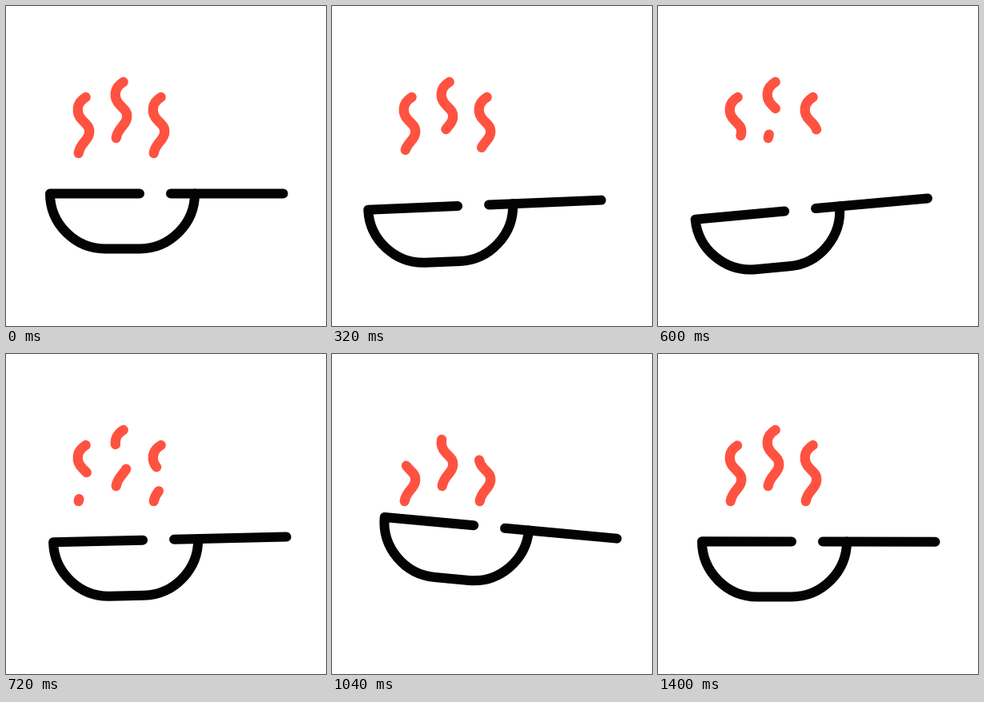
An HTML page for the animation above (1440 ms loop, 400 px wide and 400 px high).

```html
<!DOCTYPE html>
<html lang="en">
<head>
<meta charset="utf-8">
<title>Steaming pan</title>
<style>
  html, body { margin: 0; width: 100%; height: 100%; overflow: hidden; background: #fff; }
  svg { display: block; width: 100%; height: 100%; }
  path { fill: none; stroke-linecap: round; stroke-linejoin: round; }
  #pan { stroke: #030303; stroke-width: 12; }
  #steam { stroke: #ff5240; stroke-width: 12.3; }
</style>
</head>
<body>
<svg viewBox="0 0 400 400">
  <g id="steam"></g>
  <g id="pan">
    <path d="M167 234.5H55C55 272 86 303.5 124 303.5H167C205 303.5 236 272 236 234.5"/>
    <path d="M206 234.5H346.5"/>
  </g>
</svg>
<script>
const LOOP = 1440, STEP = 40;
const WAVE = "M100 114C88 121 87 134 96 143C101 148 105 151 104.5 158C104 168 93 171 91 184";

const pan = document.getElementById("pan");
const steam = document.getElementById("steam");

// Progress from 0 to 1 between two times.
const span = (t, from, to) => Math.min(1, Math.max(0, (t - from) / (to - from)));

function smooth(t, from, to) {
  const u = span(t, from, to);
  return u * u * (3 - 2 * u);
}

// Rest, first extreme, second extreme, rest again.
function swing(t, start, dip, peak, end, low, high) {
  return low * smooth(t, start, dip)
    + (high - low) * smooth(t, dip, peak)
    - high * smooth(t, peak, end);
}

function addWave(x, y) {
  const p = document.createElementNS("http://www.w3.org/2000/svg", "path");
  p.setAttribute("d", WAVE);
  p.setAttribute("pathLength", 1);
  p.setAttribute("transform", `translate(${x} ${y})`);
  return steam.appendChild(p);
}

function makePuff(x, y, delay) {
  return { delay, upper: addWave(x, y), lower: addWave(x, y) };
}

const puffs = [makePuff(-0.3, 0, 130), makePuff(46.7, -19, 0), makePuff(93.7, 0, 65)];

// Shows only the part of a wave between two fractions of its length.
function trim(path, from, to) {
  const len = to - from;
  path.style.display = len > 0.004 ? "" : "none";
  path.setAttribute("stroke-dasharray", `${len} 2`);
  path.setAttribute("stroke-dashoffset", -from);
}

function draw(t) {
  const x = swing(t, 0, 500, 870, 1350, -14, 14.2);
  const y = swing(t, 0, 545, 870, 1410, 22.5, -22.5);
  const turn = swing(t, 80, 590, 920, 1430, -5.2, 6.1);
  pan.setAttribute("transform", `translate(${x} ${y}) rotate(${turn} 200.5 234.5)`);

  for (const { delay, upper, lower } of puffs) {
    const local = t - delay;
    trim(upper, 0, 1 - span(local, 0, 840) ** 2);
    trim(lower, (1 - span(local, 575, 1310)) ** 1.65, 1);
  }
}

const start = performance.now();
function tick() {
  const t = (performance.now() - start) % LOOP;
  draw(Math.floor(t / STEP) * STEP);
  requestAnimationFrame(tick);
}
tick();
</script>
</body>
</html>
```
